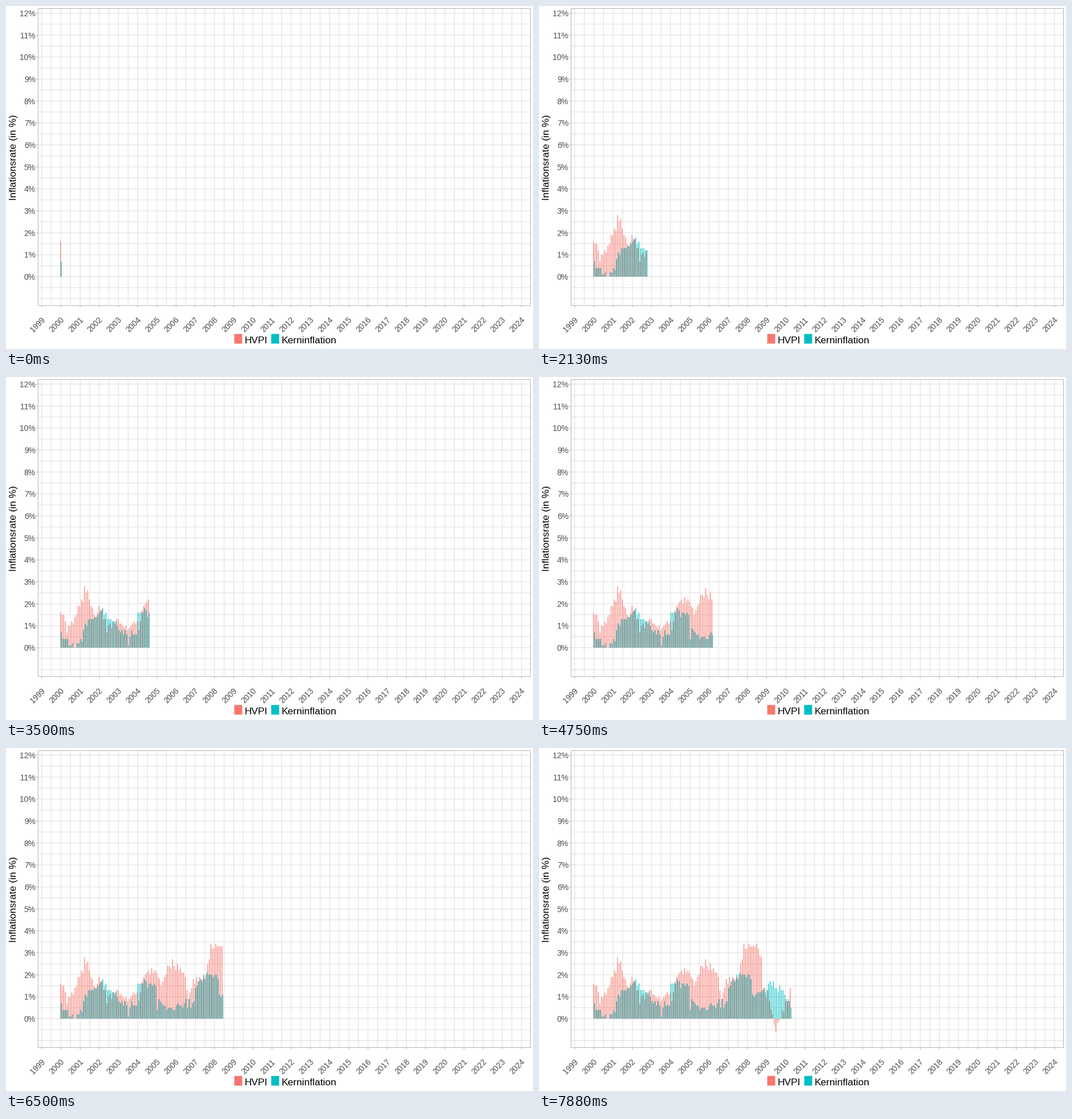
A matplotlib script that plays this animation: 927 px wide and 604 px high, repeating every 8000 ms.

```python
import matplotlib.pyplot as plt
import numpy as np
from matplotlib.animation import FuncAnimation
from matplotlib.patches import Rectangle

W, H, DPI = 927, 604, 100
FRAMES, INTERVAL = 64, 125
MONTHS_PER_FRAME = 1.951

RED, TEAL = "#F8766D", "#00BFC4"
GRID, BORDER, TICK_TEXT = "#DEDEDE", "#B3B3B3", "#4D4D4D"

LEFT, RIGHT, TOP, BOTTOM = 56, 922, 4, 527
X2000, PX_PER_DAY, BAR = 96.58, 0.09243, 1.18
Y0, PX_PER_PCT = 476.7, 38.68

# Turning points: (months since January 2000, rate in percent)
HVPI = [(0, 1.7), (4, 0.9), (10, 1.5), (16, 2.7), (22, 1.4), (25, 1.9),
        (29, 1.0), (38, 1.2), (40, 0.8), (46, 1.2), (49, 0.9), (52, 2.0),
        (59, 2.2), (63, 1.5), (68, 2.5), (78, 2.1), (80, 1.0), (84, 1.7),
        (91, 2.1), (94, 3.2), (102, 3.3), (105, 2.7), (106, 1.4),
        (109, 1.1), (114, -0.6), (118, 0.3), (123, 1.1)]
CORE = [(0, 0.4), (9, -0.1), (12, 0.5), (16, 1.1), (26, 1.7), (30, 1.3),
        (34, 1.2), (37, 0.7), (42, 0.5), (47, 0.7), (48, 1.4), (52, 1.6),
        (59, 1.5), (60, 0.8), (67, 0.5), (72, 0.5), (83, 0.8), (84, 1.6),
        (93, 2.0), (98, 1.7), (99, 1.1), (103, 1.2), (111, 1.6),
        (116, 1.4), (123, 0.5)]

rng = np.random.default_rng(4)
fig = plt.figure(figsize=(W / DPI, H / DPI), dpi=DPI, facecolor="white")
ax = fig.add_axes([0, 0, 1, 1])
ax.set(xlim=(0, W), ylim=(H, 0))
ax.axis("off")


def box(x0, y0, x1, y1, color, z=1):
    return ax.add_patch(Rectangle((x0, y0), x1 - x0, y1 - y0, fc=color,
                                  lw=0, snap=False, zorder=z))


def hline(y, x0=LEFT, x1=RIGHT, color=GRID, z=1):
    box(x0, y - 0.5, x1, y + 0.5, color, z)


def vline(x, y0=TOP, y1=BOTTOM, color=GRID, z=1):
    box(x - 0.5, y0, x + 0.5, y1, color, z)


def label(x, y, s, px, color="black", **kw):
    ax.text(x, y, s, fontsize=px * 72 / DPI, color=color, va="baseline",
            family=["Liberation Sans"], rotation_mode="anchor", **kw)


def date_x(date):
    days = np.datetime64(date, "D") - np.datetime64("2000-01-01")
    return X2000 + PX_PER_DAY * days.astype(int)


def rate_y(rate):
    return Y0 - PX_PER_PCT * rate


def draw_axes():
    for half in range(-2, 25):
        hline(rate_y(half / 2))
    for pct in range(13):
        y = rate_y(pct)
        hline(y, LEFT - 3, LEFT, BORDER)
        label(52, y + 5.4, f"{pct}%", 13.87, TICK_TEXT, ha="right")

    for year in range(1999, 2025):
        x = date_x(f"{year}-01-01")
        vline(x)
        if year < 2024:
            vline((x + date_x(f"{year + 1}-01-01")) / 2)
        vline(x, BOTTOM + 1, BOTTOM + 4, BORDER)
        label(x - 4.5, 564, str(year), 13.87, TICK_TEXT, ha="center", rotation=45)

    for y in (TOP, BOTTOM):
        hline(y + 0.5, LEFT, RIGHT + 1, BORDER, 3)
    for x in (LEFT, RIGHT):
        vline(x + 0.5, TOP, BOTTOM + 1, BORDER, 3)
    label(18.5, 341.5, "Inflationsrate (in %)", 17.5, rotation=90)


def draw_legend():
    for x, name, color in ((401.5, "HVPI", RED), (466.5, "Kerninflation", TEAL)):
        box(x, 577.5, x + 14, 594.5, color)
        label(x + 18.5, 594, name, 17.33)


def monthly(points, count):
    """Rates between the turning points, with a little scatter, in tenths."""
    trend = np.interp(np.arange(count), *zip(*points))
    return np.round(trend + rng.normal(0, 0.12, count), 1)


def bar(x0, x1, rate, color):
    return box(x0, rate_y(rate), x1, Y0, color, 2)


draw_axes()
draw_legend()

months = np.arange("2000-01", "2010-05", dtype="datetime64[M]")
rates = (monthly(points, len(months)) for points in (HVPI, CORE))
pairs = []
for month, total, core in zip(months, *rates):
    x = date_x(month)
    pairs.append((bar(x - BAR, x, total, RED), bar(x, x + BAR, core, TEAL)))


def update(i):
    last = round(MONTHS_PER_FRAME * i)
    for k, pair in enumerate(pairs):
        for patch in pair:
            patch.set_visible(k <= last)
    return [patch for pair in pairs for patch in pair]


anim = FuncAnimation(fig, update, frames=FRAMES, interval=INTERVAL,
                     repeat=True, repeat_delay=0, blit=False)
plt.show()
```
